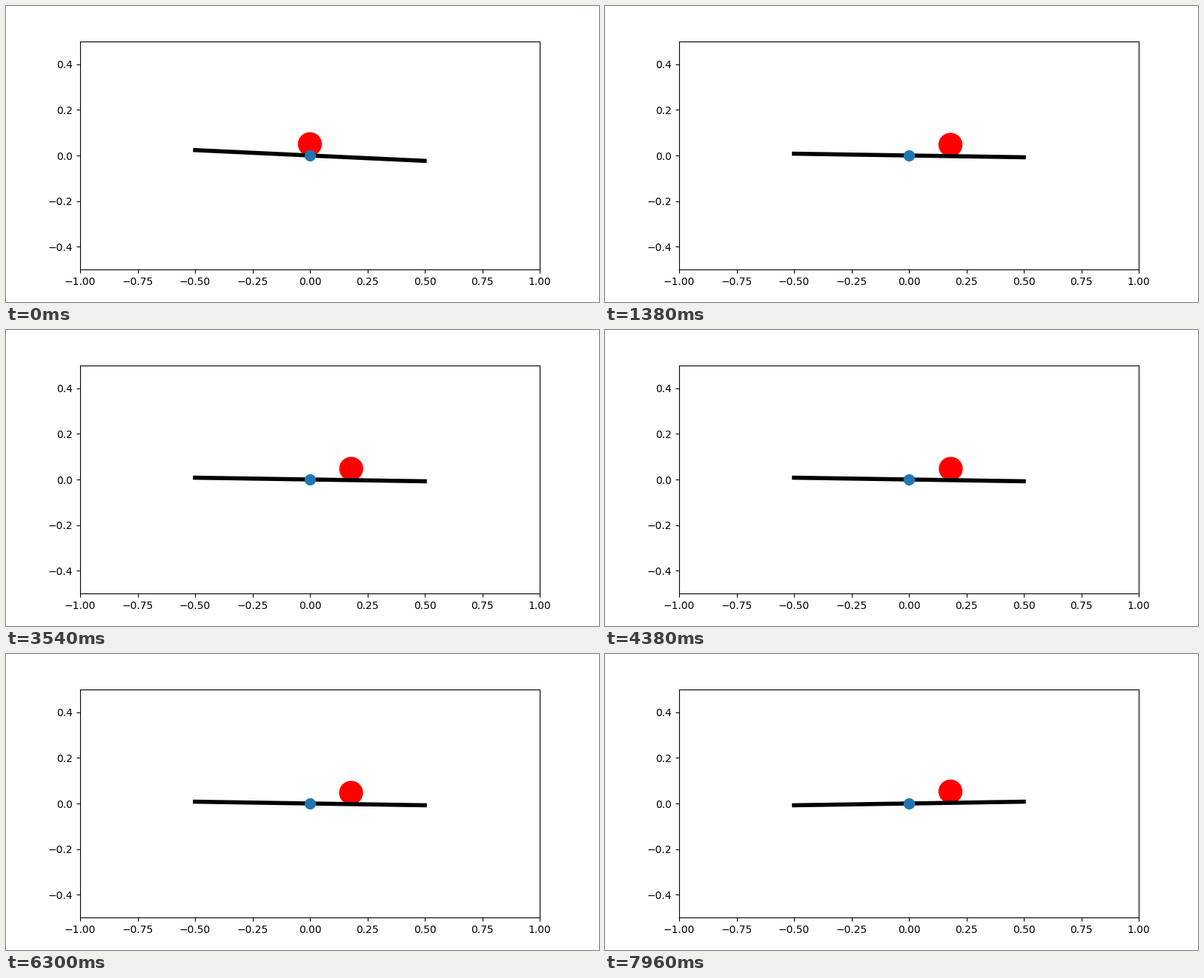
Write a matplotlib script that moves like this. It is 800 px wide and 400 px high and loops after 7980 ms.

```python
import numpy as np
import matplotlib.pyplot as plt
from matplotlib.animation import FuncAnimation

FRAMES = 399
INTERVAL = 20
UNIT = np.radians(0.9)   # the beam turns two units, up or down, every tick
RADIUS = 0.05
HALF = 0.5
REST = 0.18


def beam_units():
    """Beam tilt per tick, in units: tip over, brake, then chatter around level."""
    k = np.arange(FRAMES)
    tilt = np.where(k % 2 == 0, 1, -1)
    start = np.concatenate([
        np.arange(-3, -13, -2),          # tip to the right
        np.tile([-13, -11], 3),          # hold the slope
        np.arange(-9, 5, 2),             # swing back
        [5],
        np.tile([7, 5], 10),             # brake
        [3],
    ])
    tilt[:len(start)] = start
    # small nudges: push right, then stop again
    for push, stop in [(48, 55), (96, 105), (192, 207), (330, 347)]:
        tilt[push] = -3
        tilt[stop] = 3
    return tilt, len(start)


def ball_path(tilt, settled):
    """Integrate the slope twice, scaled so the first run ends at REST."""
    speed = -np.cumsum(tilt)
    pos = np.cumsum(speed) - speed[0]
    return pos * REST / pos[settled - 1]


tilt, settled = beam_units()
angle = tilt * UNIT
dist = ball_path(tilt, settled)

fig, ax = plt.subplots(figsize=(8, 4), dpi=100)
ax.set_xlim(-1, 1)
ax.set_ylim(-0.5, 0.5)

ball = plt.Circle((0, RADIUS), RADIUS, color="red")
ax.add_patch(ball)
beam, = ax.plot([], [], color="black", lw=4)
ax.plot(0, 0, "o", color="C0", ms=10)


def update(i):
    c, s = np.cos(angle[i]), np.sin(angle[i])
    beam.set_data([-HALF * c, HALF * c], [-HALF * s, HALF * s])
    ball.center = (dist[i] * c, dist[i] * s + RADIUS)
    return beam, ball


anim = FuncAnimation(fig, update, frames=FRAMES, interval=INTERVAL,
                     init_func=lambda: update(0), repeat=True, repeat_delay=0)
plt.show()
```
